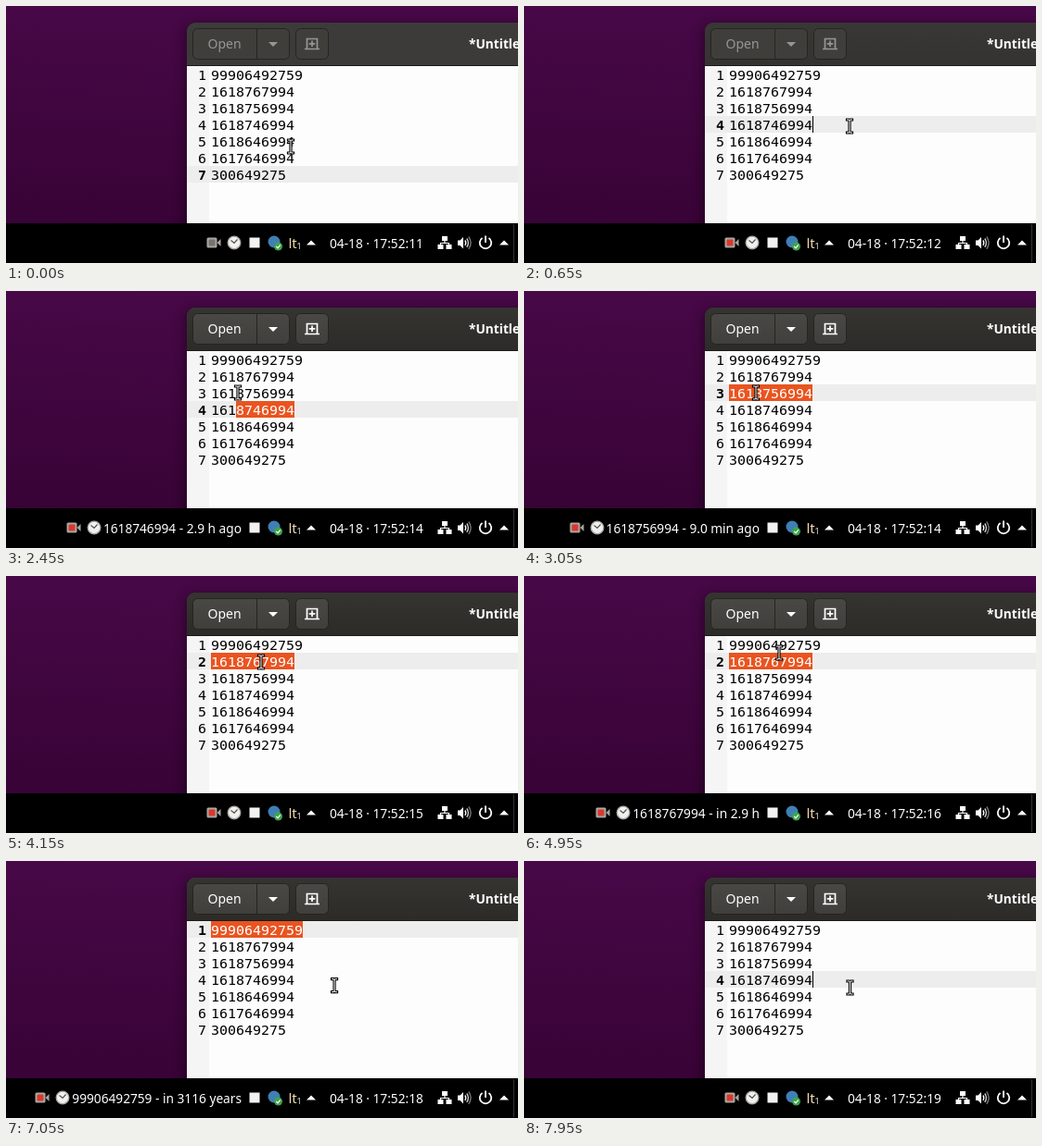
Recreate the animation shown at these times as an HTML page. Size 552 by 278 pixels, loop 8000 ms.

```html
<!DOCTYPE html>
<html lang="en">
<head>
<meta charset="utf-8">
<style>
html, body { margin: 0; width: 100%; height: 100%; overflow: hidden; background: #000; }
svg { display: block; width: 552px; height: 278px; }
text { white-space: pre; }
.ui { font: 13.7px "Noto Sans", "Open Sans", sans-serif; }
.mono { font: 14.95px "DejaVu Sans Mono", monospace; }
</style>
</head>
<body>
<svg id="stage" viewBox="0 0 552 278" xmlns="http://www.w3.org/2000/svg">
  <defs>
    <linearGradient id="wall" x1=".1" y1="0" x2="0" y2="1">
      <stop offset="0" stop-color="#470847"/>
      <stop offset="1" stop-color="#380336"/>
    </linearGradient>
    <linearGradient id="bar" x1="0" y1="0" x2="0" y2="1">
      <stop offset="0" stop-color="#353431"/>
      <stop offset="1" stop-color="#2c2b28"/>
    </linearGradient>
    <linearGradient id="btn" x1="0" y1="0" x2="0" y2="1">
      <stop offset="0" stop-color="#494845"/>
      <stop offset="1" stop-color="#403f3b"/>
    </linearGradient>
    <filter id="blur" x="-20%" y="-20%" width="140%" height="140%"><feGaussianBlur stdDeviation="7"/></filter>
    <clipPath id="selClip"><rect id="selBox" height="18"/></clipPath>
    <clipPath id="desk"><rect width="552" height="235"/></clipPath>
    <path id="head" d="M195 65V27a9 9 0 0 1 9-9H552V65Z"/>
    <path id="ibeam" d="M-2.500-7H-1Q0-7 0-6Q0-7 1-7H2.500M0-6V6M-2.500 7H-1Q0 7 0 6Q0 7 1 7H2.500"/>
  </defs>

  <g clip-path="url(#desk)">
    <rect width="552" height="235" fill="url(#wall)"/>
    <rect x="194" y="21" width="400" height="260" rx="8" opacity=".45" filter="url(#blur)"/>
    <use href="#head" fill="#3d3b39"/>
    <use href="#head" id="headOn" fill="url(#bar)"/>
    <g id="buttons" stroke="#252421">
      <rect x="201.500" y="24.500" width="104" height="33" rx="5"/>
      <rect x="312.500" y="24.500" width="35" height="33" rx="5"/>
      <path d="M270.500 25V57"/>
    </g>
    <g id="tools">
      <text class="ui" x="217.500" y="46" style="font-size:14px">Open</text>
      <path d="M283 39h10l-5 5Z"/>
      <path id="plus" d="M322 46.500H338M324.500 46V35.500H335.500V46M330 37.500v6.500M326.700 40.800h6.600" fill="none" stroke-width="1.700"/>
    </g>
    <text class="ui" x="499" y="46" style="font-weight:700" fill="#fff">*Untitled</text>
    <rect x="195" y="64" width="357" height="1" fill="#1d1c1a"/>
    <rect x="195" y="65" width="357" height="170" fill="#fdfdfd"/>
    <rect x="195" y="65" width="24" height="170" fill="#f5f5f5"/>
    <rect id="current" x="195" width="357" height="18" fill="#ededed"/>
    <g id="lines" class="mono"></g>
    <rect id="selFill" height="18" fill="#e95420"/>
    <g id="selText" class="mono" fill="#fff" clip-path="url(#selClip)"></g>
    <rect id="caret" width="1" height="18"/>
    <g id="beam" fill="none" stroke-linecap="square">
      <use href="#ibeam" stroke="#000" stroke-width="3.200"/>
      <use href="#ibeam" stroke="#fff" stroke-width="1"/>
    </g>
  </g>

  <rect y="235" width="552" height="43"/>
  <rect x="547" y="236" width="1" height="41" fill="#333"/>
  <g id="cam">
    <rect x="-7" y="250.500" width="11" height="11" rx="1.500" fill="#aaa6a2"/>
    <path d="M4 256l4-4v8Z" fill="#aaa6a2"/>
    <rect id="lens" x="-5" y="252.500" width="7" height="7" rx="1"/>
  </g>
  <g id="clock">
    <circle cy="256" r="6.800" fill="#f1f0ee" stroke="#aaa8a5" stroke-width="1.300"/>
    <path d="M-3.500 253.500L0 256.500L3.500 252.500" fill="none" stroke="#55524e" stroke-width="1.200"/>
  </g>
  <text id="label" class="ui" x="254" y="262" text-anchor="end" fill="#fff"></text>
  <rect x="262.500" y="250.500" width="11" height="11" fill="#f2f2f2"/>
  <circle cx="289" cy="255" r="6.500" fill="#3f7fb5"/>
  <circle cx="293.500" cy="260" r="4.500" fill="#3fa34d"/>
  <path d="M291.300 260l1.700 1.800 2.800-3.500" fill="none" stroke="#fff" stroke-width="1.200"/>
  <text class="ui" x="304.500" y="261.500" fill="#f3d9ae" style="font-size:15px">lt</text>
  <text class="ui" x="313.500" y="262.500" fill="#eee" style="font-size:9px">1</text>
  <path d="M324 258.500l5-5 5 5ZM532 258.500l5-5 5 5Z" fill="#fff"/>
  <text id="time" class="ui" x="349" y="262" fill="#fff"></text>
  <g fill="#fff">
    <path d="M470 249h6v5h-6ZM465.500 258h6v5h-6ZM474.500 258h6v5h-6Z"/>
    <path d="M473 254v2.500M468.500 258v-1.500h9v1.500" fill="none" stroke="#fff" stroke-width="1.200"/>
    <path d="M487 253.500h2.500l3.500-3.500v12.500l-3.500-3.500h-2.500Z"/>
  </g>
  <g fill="none" stroke="#fff" stroke-width="1.400">
    <path d="M494.800 253.500q1.800 2.700 0 5.400"/>
    <path d="M496.800 251.500q3.200 4.700 0 9.400" opacity=".8"/>
    <path d="M498.800 249.500q4.600 6.700 0 13.400" opacity=".45"/>
    <path d="M513.500 251a6.200 6.200 0 1 0 7 0M517 248.500v7.500" stroke-width="1.800"/>
  </g>
</svg>
<script>
const LOOP = 8000, STEP = 50, LEFT = 221, CHAR = 9, NOW = 1618757534;
const rows = ["99906492759", "1618767994", "1618756994", "1618746994", "1618646994", "1617646994", "300649275"];

// pointer glides: start, end, destination
const glides = [
  [0, 450, 351, 130], [650, 1250, 211, 130], [1400, 1450, 224, 130],
  [1800, 2150, 250, 110], [3400, 3750, 275, 93], [4500, 4950, 275, 83],
  [5300, 5450, 280, 76], [6300, 7150, 357, 137], [7900, 7950, 351.5, 137]
];

// a click on a row; its time label shows at `done`
const picks = [
  { at: 0, row: 7, idle: true },
  { at: 600, row: 4, done: 1250, drag: true },
  { at: 2750, row: 3, done: 3050 },
  { at: 4050, row: 2, done: 4500 },
  { at: 5700, row: 1, done: 6000 },
  { at: 7250, row: 4 }
];

const $ = id => document.getElementById(id);
const set = (el, attrs) => { for (const k in attrs) el.setAttribute(k, attrs[k]); };
const clamp = (v, lo, hi) => Math.min(hi, Math.max(lo, v));
const ramp = (t, from, to) => clamp((t - from) / (to - from), 0, 1);
const rowTop = r => 65 + 18 * (r - 1);

function addText(parent, x, y, str, anchor = "start") {
  const el = document.createElementNS("http://www.w3.org/2000/svg", "text");
  set(el, { x, y, "text-anchor": anchor });
  el.textContent = str;
  return parent.appendChild(el);
}

const numbers = rows.map((str, i) => {
  const y = rowTop(i + 1) + 15;
  addText($("lines"), LEFT, y, str);
  addText($("selText"), LEFT, y, str);
  return addText($("lines"), 216, y, i + 1, "end");
});

function pointer(t) {
  let x = 307, y = 152;
  for (const [from, to, gx, gy] of glides) {
    const u = ramp(t, from, to), e = u * u * (3 - 2 * u);
    x += (gx - x) * e;
    y += (gy - y) * e;
  }
  return [x, y];
}

function describe(stamp) {
  const diff = stamp - NOW, s = Math.abs(diff);
  const span = s < 3600 ? (s / 60).toFixed(1) + " min"
    : s < 86400 ? (s / 3600).toFixed(1) + " h"
    : Math.floor(s / 31536000) + " years";
  return `${stamp} - ` + (diff < 0 ? span + " ago" : "in " + span);
}

// selected columns and caret column (-1 hides it)
function selection(pick, t, x) {
  const len = rows[pick.row - 1].length;
  const col = clamp(Math.round((x - LEFT) / CHAR), 0, len);
  if (pick.idle) return [0, 0, -1];
  if (pick.drag) return [col, len, col < len ? -1 : len];
  if (pick.done && t >= pick.at + 100) return [0, len, -1];
  return [0, 0, col];
}

function drawHeader(t) {
  const fade = ramp(t, 550, 750), c = 150 + 105 * ramp(t, 650, 800);
  const ink = `rgb(${c},${c},${c})`;
  set($("headOn"), { opacity: fade });
  set($("buttons"), { fill: fade > 0.5 ? "url(#btn)" : "#403e3b" });
  set($("tools"), { fill: ink });
  set($("plus"), { stroke: ink });
}

function drawEditor(t, pick) {
  const [x, y] = pointer(t), top = rowTop(pick.row);
  const [from, to, caret] = selection(pick, t, x);
  const box = { x: LEFT + from * CHAR, y: top, width: (to - from) * CHAR };
  set($("current"), { y: top });
  set($("selFill"), box);
  set($("selBox"), box);
  set($("caret"), { x: LEFT + caret * CHAR, y: top, opacity: caret < 0 ? 0 : 1 });
  numbers.forEach((n, i) => set(n, { "font-weight": i + 1 === pick.row ? 700 : 400 }));
  set($("beam"), { transform: `translate(${x} ${y})` });
}

function drawPanel(t, pick, last) {
  // the previous label lingers briefly after a click
  const shown = t >= pick.done ? pick : t < pick.at + 100 && last && last.done ? last : null;
  const label = $("label");
  label.textContent = shown ? describe(rows[shown.row - 1]) : "";
  const x = shown ? Math.round(254 - label.getComputedTextLength()) : 256;
  set($("cam"), { transform: `translate(${x - 32.5} 0)` });
  set($("clock"), { transform: `translate(${x - 10} 0)` });
  set($("lens"), { fill: t < 50 ? "#77736f" : "#d8382e" });
  $("time").textContent = "04-18 · 17:52:" + (11 + Math.floor((t + 550) / 1000));
}

function render(now) {
  const t = Math.floor((now % LOOP) / STEP) * STEP;
  const i = picks.filter(p => p.at <= t).length - 1;
  drawHeader(t);
  drawEditor(t, picks[i]);
  drawPanel(t, picks[i], picks[i - 1]);
}

const start = performance.now();
function tick() {
  render(performance.now() - start);
  requestAnimationFrame(tick);
}
tick();
</script>
</body>
</html>
```
